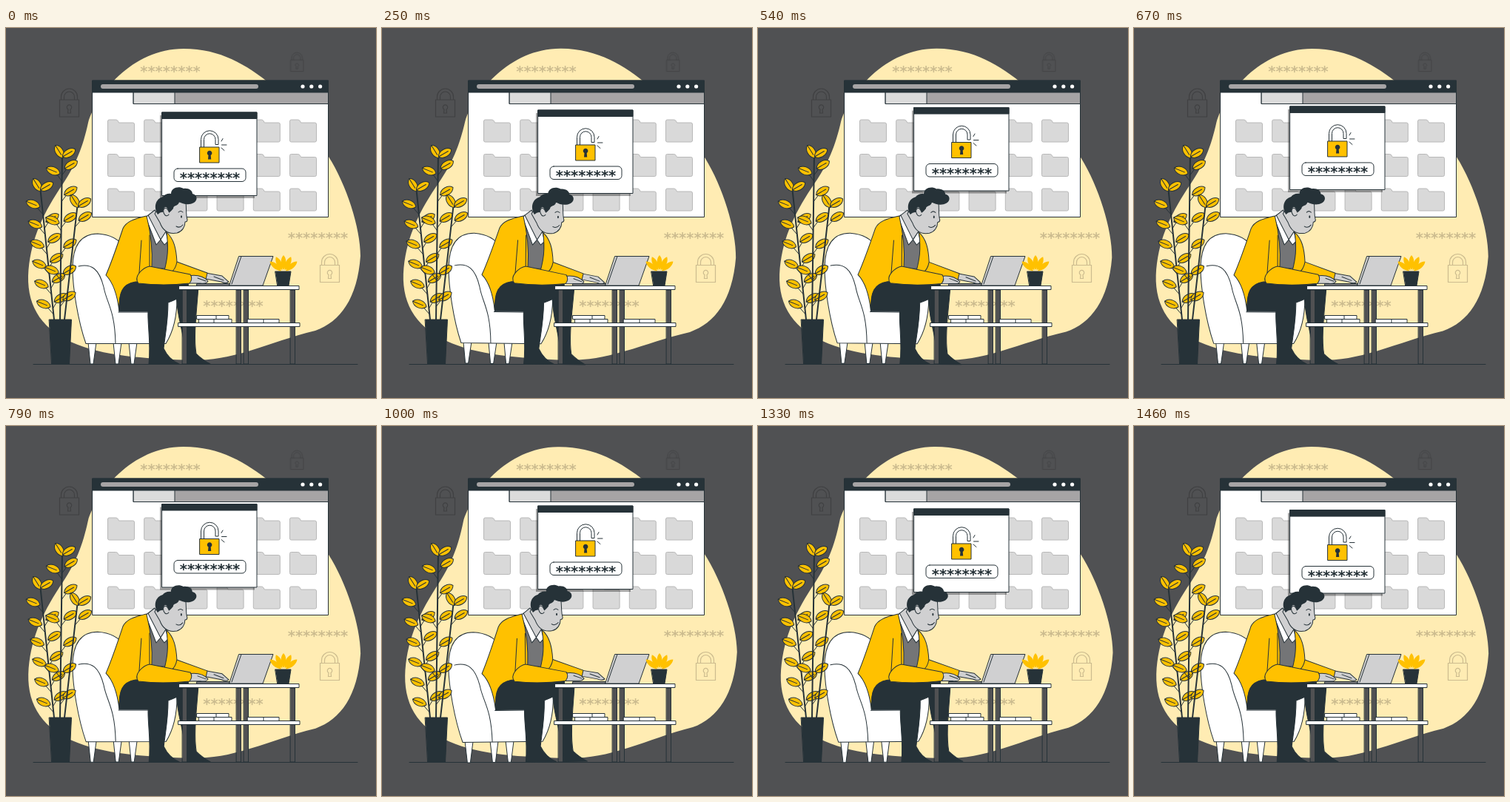
Write an HTML page that moves like this. It is 500 px wide and 500 px high and loops after 1.5 s.

```html
<!DOCTYPE html>
<html lang="en">
<head>
<meta charset="utf-8">
<title>Password entry</title>
<style>
  html, body { margin: 0; width: 100%; height: 100%; overflow: hidden; background: #505153; }
  svg { display: block; width: 100%; height: 100%; }
  text { font: bold 19.5px "DejaVu Sans", sans-serif; text-anchor: middle; }
  .line { stroke: #263238; stroke-width: 1; stroke-linejoin: round; stroke-linecap: round; fill: none; }
  .dark { fill: #263238; }
  .white { fill: #fff; }
  .gold { fill: #ffc100; }
  .grey { fill: #d0d0d1; }
  .slate { fill: #747577; }
  .faint { opacity: .2; }
</style>
</head>
<body>
<svg viewBox="0 0 500 500">
  <defs>
    <path id="folder" d="M0 2Q0 0 2 0H11Q13 0 14 2L15 4H34Q36 4 36 6V28Q36 30 34 30H2Q0 30 0 28Z" fill="#d9d9d9" stroke="#b8b8b8"/>
    <g id="leaf" class="line" stroke-width=".8">
      <path class="gold" d="M-10 0C-6-7 6-7 10 0C6 7-6 7-10 0Z"/>
      <path d="M-10 0H5"/>
    </g>
    <path id="blade" class="gold" d="M0-4C-5-11-4-20 0-24C4-20 5-11 0-4Z"/>
    <path id="chairLeg" class="white" d="M0 425H11L7 454H3Z"/>
    <path id="tableLeg" fill="#505153" d="M0 354H6V454H0Z"/>
    <circle id="dot" class="white" r="2.6"/>
    <g id="lock" fill="none" stroke="#000" stroke-width="1.2">
      <path d="M0 16H26V39H0ZM2 16V12A11 11 0 0 1 24 12V16M6 16V12A7 7 0 0 1 20 12V16"/>
      <path d="M11.5 29A3.2 3.2 0 1 1 14.5 29L15 34H11Z"/>
    </g>
  </defs>

  <path id="blob" fill="#ffecb3" d="M240 28C290 28 325 50 358 76C390 102 412 140 436 174C460 212 479 270 479 308C475 365 452 397 418 409C385 417 360 427 330 436C300 445 280 449 250 449C200 447 140 445 97 428C50 410 29 378 30 335C32 290 48 255 72 218C95 185 104 160 111 128C122 90 170 28 240 28Z"/>

  <g class="faint">
    <use href="#lock" transform="translate(72.5 81)"/>
    <use href="#lock" transform="translate(384.5 32.5) scale(.67)"/>
    <use href="#lock" transform="translate(424.5 304.5)"/>
    <text x="222" y="65">********</text>
    <text x="421.5" y="290">********</text>
    <text x="307" y="382">********</text>
  </g>
  <path class="line" d="M37 454.5H475"/>

  <g class="line">
    <rect class="white" x="117" y="71" width="318.5" height="184.5"/>
    <rect class="dark" x="117" y="71" width="318.5" height="16"/>
    <rect x="128" y="76" width="213" height="6" rx="3" fill="#a6a4a5" stroke="none"/>
    <rect x="172.5" y="87" width="263" height="15.5" fill="#a6a4a5"/>
    <rect x="172.5" y="87" width="55.5" height="15.5" fill="#dbdbdb"/>
  </g>
  <g id="window"></g>

  <g id="popup">
    <rect x="208" y="118" width="128" height="112" opacity=".35"/>
    <g class="line">
      <rect class="white" x="211" y="114" width="128" height="112.5"/>
      <rect class="dark" x="211" y="114" width="128" height="8.5"/>
      <path class="white" d="M263.5 161V150.5A11.7 11.7 0 0 1 287 150.5V157.5H283V150.5A7.7 7.7 0 0 0 267.5 150.5V161Z"/>
      <rect class="gold" x="262" y="161" width="26" height="21"/>
      <path d="M291 153L293 149.5M291.5 158H298M291 162L295 165.5"/>
      <rect class="white" x="227" y="190" width="97" height="17.5" rx="5"/>
    </g>
    <path class="dark" d="M273.5 172A3.3 3.3 0 1 1 276.7 172L277.2 177.5H273Z"/>
    <text class="dark" x="275.5" y="209">********</text>
  </g>

  <g id="person" class="line">
    <g id="chairLegs"></g>
    <path class="white" d="M108 426.500C97 395 90 350 90 325C90 290 104 278 124 278C140 279 152 284 160 297L231 366C231 390 225 412 216 426.500Z"/>
    <path d="M98 322C116 318 126 326 132 350C136 372 147 380 148 426M152 384H192"/>
    <path class="dark" d="M228 349H260C258 380 253 415 257 440Q265 448 276 454H244C244 425 232 395 231 370Z"/>
    <path class="dark" d="M153 383C151 355 156 343 175 342H246C249 358 238 364 219 371C219 396 215 416 213 433Q220 448 234 454H193C196 425 191 400 192 383Z"/>

    <path class="grey" d="M270 331L292 335L301 343Q297 346 291 343L270 339Z"/>
    <path class="gold" d="M217 302L231 316L272 331L270 340L222 333Z"/>
    <path class="slate" d="M194 262L217 280L219 302L216 325H192Z"/>
    <path class="grey" d="M201 246L191 254Q199 275 209 286L217 274Z"/>
    <path class="white" d="M192 253L209 286L203 293L189 256ZM209 286L216 275L219 288L214 293Z"/>
    <path class="gold" d="M190 254C172 258 162 262 158 271C150 295 142 318 135 334C147 346 151 366 153 383C152 357 157 346 175 343H222L197 323C198 305 196 278 190 254Z"/>
    <path class="gold" d="M217 276C227 285 230 298 231 316Q229 327 222 331L214 328C218 312 220 300 217 276Z"/>
    <path class="grey" d="M246 335Q264 332 273 342Q271 346 263 345H245Z"/>
    <path d="M259 338L270 342M281 336L294 341"/>
    <path class="gold" d="M194 280V322L249 333Q253 339 248 345C222 348 195 347 179 345Q174 339 180 331L183 287"/>
    <path d="M194 322Q187 323 180 331"/>

    <path class="grey" d="M207 242L215 235H243C244 246 243 252 245 259Q245 262 242 262C242 269 238 275 231 277C220 279 212 274 208 263L201 251Z"/>
    <path d="M230 268Q235 271 239 266M233 249Q236 246 239 249"/>
    <ellipse class="dark" stroke="none" cx="237" cy="255" rx="1" ry="1.800"/>
    <path class="dark" stroke="none" d="M205 252C199 242 202 231 212 228C214 225 219 223 223 224C223 216 233 213 240 217C247 216 252 220 252 224C258 225 260 232 254 236C247 240 239 238 234 235C233 241 226 239 226 244Q221 250 219 250C219 239 212 240 213 249Q209 248 205 252Z"/>
    <path class="grey" d="M220 248C216 238 209 246 215 253Q218 255 220 252"/>
  </g>

  <g class="line">
    <g id="plant"></g>
    <path class="dark" d="M58.500 394H88.500L85.500 454.500H62Z"/>
  </g>

  <g class="line">
    <g id="tableLegs"></g>
    <rect class="white" x="234" y="348.500" width="162" height="5"/>
    <rect class="white" x="233" y="398.500" width="164" height="5"/>
    <path class="white" d="M261 393.500H305V398.500H261ZM258 388.500H301V393.500H258ZM326.500 393.500H369V398.500H326.500Z"/>
    <path d="M284 388.500V393.500M281 393.500V398.500M348 393.500V398.500"/>
    <path class="slate" d="M258 345.500H302L347 347.500V348.500H258Z"/>
    <path class="grey" d="M315 308.500H361L347 348H302Z"/>
    <path d="M318 308.500L305 346"/>
    <g id="sprout" stroke="none"></g>
    <path class="dark" d="M364 329H385L382 348H367Z"/>
  </g>
</svg>
<script>
const byId = id => document.getElementById(id);
const use = (name, x, y = 0, angle = 0) =>
  `<use href="#${name}" transform="translate(${x} ${y}) rotate(${angle})"/>`;
const fill = (id, parts) => byId(id).innerHTML = parts.join('');
const range = (from, to, step) =>
  Array.from({ length: Math.floor((to - from) / step) + 1 }, (_, i) => from + i * step);

fill('window', [
  ...range(401, 425, 11.8).map(x => use('dot', x, 79)),
  ...range(124, 217, 46.5).flatMap(y => range(137.5, 384, 49.2).map(x => use('folder', x, y)))
]);
fill('chairLegs', [111, 145, 166].map(x => use('chairLeg', x)));
fill('tableLegs', [238.5, 311.5, 321.5, 384.5].map(x => use('tableLeg', x)));
fill('sprout', range(-50, 50, 25).map(angle => use('blade', 375, 331, angle)));

// A stem runs from its tip to the pot; left and right give the first leaf height and the spacing.
const stems = [
  { x: 46, y: 214, foot: 65, left: [238, 27], right: [257, 27] },
  { x: 76, y: 169, foot: 73, left: [193, 67], right: [185, 35.5] },
  { x: 97, y: 236, foot: 79, left: [400, 1], right: [255, 150] }
];

function drawStem({ x, y, foot, left, right }) {
  const at = h => x + (foot - x) * (h - y) / (394 - y);
  const side = ([first, gap], dir) => range(first, 375, gap).map(h =>
    `<path d="M${at(h + 14)} ${h + 14}L${at(h) + 8 * dir} ${h + 3}"/>` +
    use('leaf', at(h) + 12 * dir, h, dir < 0 ? 22 : -30));
  return [
    `<path d="M${x} ${y}L${foot} 394" stroke-width="2"/>`,
    ...side(left, -1), ...side(right, 1),
    use('leaf', x - 4, y - 2, 58), use('leaf', x + 9, y, -30)
  ].join('');
}
fill('plant', stems.map(drawStem));

const LOOP = 1500;
// Triangle wave: 0 at the start, 1 at a quarter, -1 at three quarters.
const sway = p => 1 - 4 * Math.abs((p + .25) % 1 - .5);

function draw() {
  const p = performance.now() % LOOP / LOOP;
  const lift = 9 * (1 - Math.abs(2 * p - 1));
  byId('popup').setAttribute('transform', `translate(0 ${-lift})`);
  byId('blob').setAttribute('transform', `rotate(${sway(p)} 255 238)`);
  byId('person').setAttribute('transform', `rotate(${sway(p)} 195 335)`);
  requestAnimationFrame(draw);
}
draw();
</script>
</body>
</html>
```
